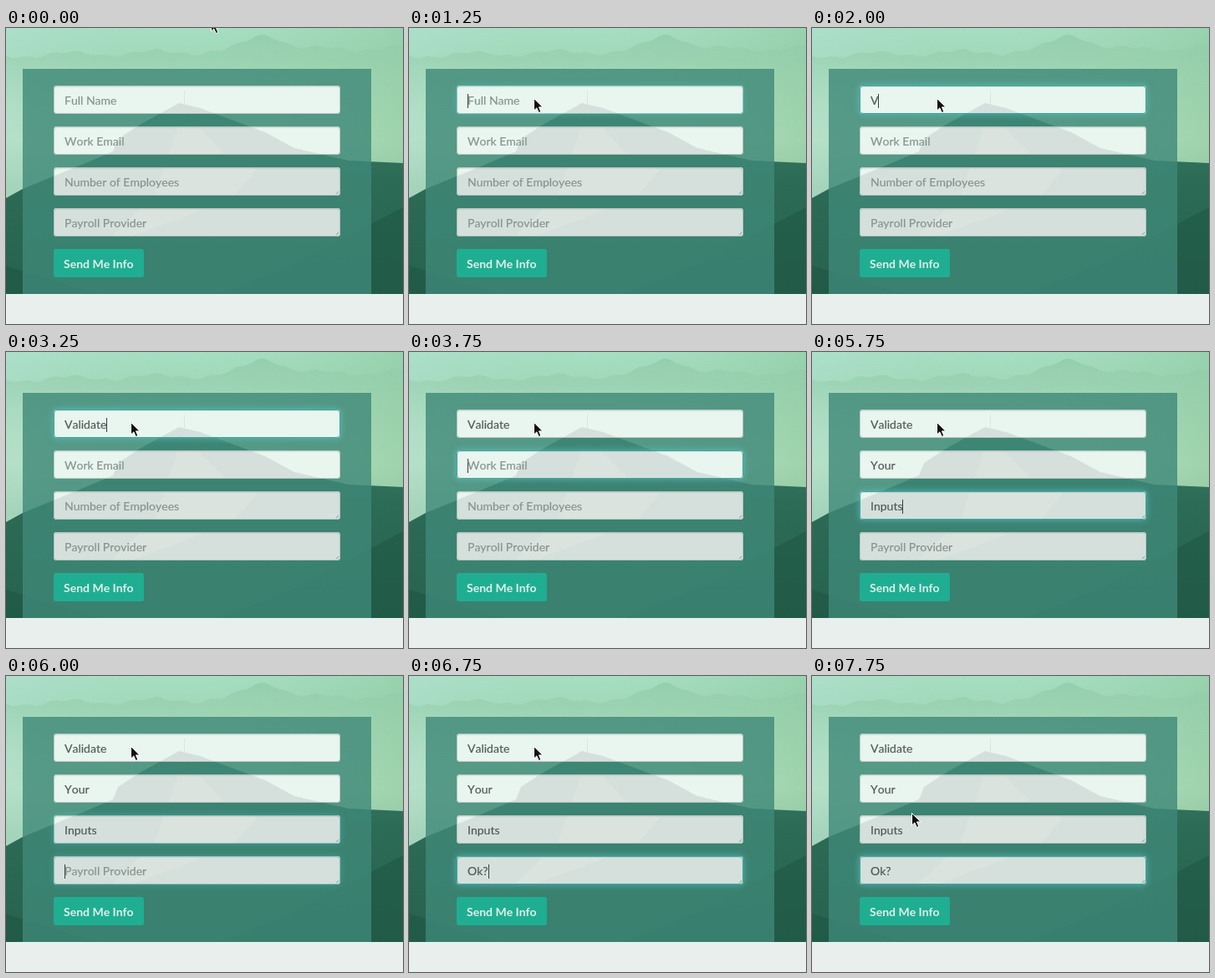
An HTML page for the animation above (8000 ms loop, 475 by 355 pixels).

```html
<!DOCTYPE html>
<html lang="en">
<head>
<meta charset="utf-8">
<style>
html, body { margin: 0; width: 100%; height: 100%; overflow: hidden; }
body { position: relative; background: #e8efed; font: 14px/34px Lato, sans-serif; font-kerning: none; }
svg { position: absolute; left: 0; top: 0; }
.field, .button { position: absolute; left: 57px; height: 34px; box-sizing: border-box; white-space: pre; }
.field {
  width: 343px; padding-left: 12px; border: 1px solid rgba(170, 187, 181, .75);
  border-radius: 4px; color: #505b58; -webkit-text-stroke: .2px;
}
.field.empty { color: #87938f; }
.caret { display: inline-block; width: 1px; height: 17px; margin-right: -1px; vertical-align: -4px; background: #34403d; }
.button { top: 265px; width: 108px; padding-left: 12px; border-radius: 3px; background: #1fae92; color: #e0f0ea; font-weight: bold; line-height: 36px; }
</style>
</head>
<body>
<svg width="475" height="355">
  <defs>
    <linearGradient id="sky" x2="0" y2="1">
      <stop offset="0" stop-color="#a6dec3"/>
      <stop offset=".12" stop-color="#a0d8b8"/>
      <stop offset=".42" stop-color="#b3dfbf"/>
      <stop offset=".6" stop-color="#9bcdae"/>
    </linearGradient>
    <linearGradient id="tint">
      <stop offset="0" stop-color="#b8e2da" stop-opacity=".35"/>
      <stop offset=".45" stop-color="#a5d8b3" stop-opacity="0"/>
      <stop offset="1" stop-color="#86c496" stop-opacity=".45"/>
    </linearGradient>
    <linearGradient id="haze" x2="0" y2="1">
      <stop offset="0" stop-color="#8fcaa9"/>
      <stop offset="1" stop-color="#a1d6b1" stop-opacity="0"/>
    </linearGradient>
    <linearGradient id="land" x2="0" y2="1">
      <stop offset="0" stop-color="#3d7f69"/>
      <stop offset=".4" stop-color="#2c6b56"/>
      <stop offset="1" stop-color="#27634f"/>
    </linearGradient>
    <path id="hill" d="M0 204L20 193L100 160L128 148L134 133L160 116L207 90L232 96L310 125L345 144L410 159L475 162V319H0Z"/>
    <path id="face" d="M212 100L262 152L300 170L270 205L112 264L178 200Z"/>
    <clipPath id="boxes"></clipPath>
  </defs>
  <rect width="475" height="319" fill="url(#sky)"/>
  <rect width="475" height="319" fill="url(#tint)"/>
  <path id="ridge" fill="url(#haze)" opacity=".75"/>
  <use href="#hill" fill="url(#land)"/>
  <path fill="#1c5442" opacity=".5" d="M0 285L110 319H0ZM475 215L350 281L255 319H475Z"/>
  <rect x="20" y="49" width="417" height="270" fill="#3f8978" opacity=".8"/>
  <path d="M213.5 75V92" stroke="#4b8775" opacity=".6"/>
  <g clip-path="url(#boxes)">
    <rect width="475" height="319" fill="#e9f5ef"/>
    <use href="#hill" fill="#d5e0dc"/>
    <use href="#face" fill="#dfe7e2" opacity=".5"/>
    <path d="M213.5 75V92" stroke="#d8e6df"/>
  </g>
  <path d="M395 199L398 196M395 248L398 245" stroke="#899a94"/>
</svg>
<div class="button">Send Me Info</div>
<svg id="cursor" width="14" height="20" style="z-index:1">
  <path d="M.5 .5V15L3.8 11.9L6.3 17.5L8.9 16.4L6.5 10.9H11Z" fill="#111" stroke="#fff"/>
</svg>
<script>
const LOOP = 8000, STEP = 250;

// each field: when it gains focus, and when its typing begins and ends
const form = [
  { label: 'Full Name', answer: 'Validate', focus: 1250, type: 1750, done: 3250 },
  { label: 'Work Email', answer: 'Your', focus: 3500, type: 3750, done: 4000 },
  { label: 'Number of Employees', answer: 'Inputs', focus: 4250, type: 4500, done: 5750 },
  { label: 'Payroll Provider', answer: 'Ok?', focus: 6000, type: 6250, done: 6750 }
];
const CARET_OFF = 7500;

const byId = id => document.getElementById(id);
const progress = (t, from, to) => Math.min(1, Math.max(0, (t - from) / (to - from)));

function ridgePath() {
  let d = 'M0 95';
  for (let x = 0; x <= 480; x += 6) {
    const peak = 19 * Math.exp(-(((x - 311) / 30) ** 2));
    const y = 33 - x / 50 + 3 * Math.sin(x / 16) + 1.5 * Math.sin(x / 5) - peak;
    d += `L${x} ${y.toFixed(1)}`;
  }
  return d + 'V95Z';
}
byId('ridge').setAttribute('d', ridgePath());

form.forEach((field, i) => {
  const top = 69 + 49 * i;
  byId('boxes').innerHTML += `<rect x="57" y="${top}" width="343" height="34" rx="4"/>`;
  field.el = document.createElement('div');
  field.el.style.top = top + 'px';
  document.body.append(field.el);
});

function drawField({ el, label, answer, focus, type, done }, i, t) {
  const blur = form[i + 1]?.focus ?? LOOP;
  const active = t >= focus && t < blur;
  const glow = progress(t, focus - STEP, focus + STEP) - progress(t, blur - STEP, blur + STEP) * (blur < LOOP);
  const text = answer.slice(0, Math.floor(answer.length * progress(t, type, done)));
  const caret = active && t < CARET_OFF ? '<i class="caret"></i>' : '';
  el.className = text ? 'field' : 'field empty';
  el.innerHTML = text ? text + caret : caret + label;
  el.style.borderColor = glow ? `rgba(60, 170, 156, ${glow})` : '';
  el.style.boxShadow = `inset 0 1px 1px rgba(0,0,0,.075), 0 0 8px rgba(102,210,222,${.6 * glow})`;
}

function draw(time) {
  const t = Math.floor(time / STEP) * STEP;
  form.forEach((field, i) => drawField(field, i, t));
  const enter = progress(t, 0, 750), leave = progress(t, 7250, 7750);
  const x = 245 - 96 * enter - 110 * Math.sin(Math.PI * enter) - 30 * leave;
  const y = -11 + 95 * enter + 80 * leave;
  byId('cursor').style.transform = `translate(${Math.round(x)}px, ${Math.round(y)}px)`;
}

const start = performance.now();
function tick() {
  draw((performance.now() - start) % LOOP);
  requestAnimationFrame(tick);
}
tick();
</script>
</body>
</html>
```
